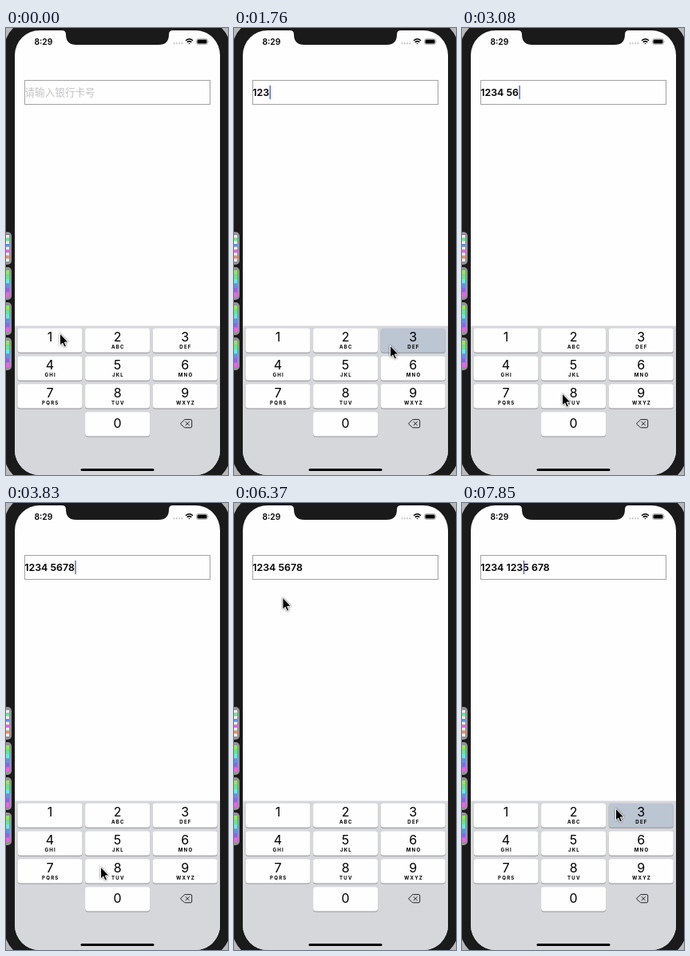
An HTML page that plays this animation: 278x559 px, repeating every 8000 ms.

```html
<!DOCTYPE html>
<html lang="zh">
<head>
<meta charset="utf-8">
<title>Card number input</title>
<style>
  html, body { margin: 0; height: 100%; overflow: hidden; background: #b8b8b8; }
  svg { display: block; width: 278px; height: 559px; font-family: Inter, "Noto Sans", sans-serif; }
  .digit { font-size: 16px; text-anchor: middle; }
  .letters { font-size: 6.1px; font-weight: 700; letter-spacing: 1.2px; text-anchor: middle; }
  .hint { font: 12.6px "Noto Sans CJK SC", "Noto Sans CJK", sans-serif; fill: #c3c3c5; }
  .value { font-size: 12.4px; font-weight: 600; }
  #pointer { filter: drop-shadow(0 .7px .8px #0009); }
</style>
</head>
<body>
<svg viewBox="0 0 278 559">
  <rect x="-2" y="-10" width="283" height="579" rx="36" fill="#1a1a1b"/>
  <g id="dock"></g>
  <clipPath id="screen"><rect x="11" y="3" width="257" height="556" rx="31"/></clipPath>
  <g clip-path="url(#screen)">
    <path fill="#fefefe" d="M11 3h257v556H11z"/>
    <path fill="#d6d7db" d="M11 372.5h257V559H11z"/>
    <path fill="#1a1a1b" d="M70 2v1q5 0 5 5q0 13 13 13H191q13 0 13-13q0-5 5-5v-1z"/>
    <text x="35.500" y="20.500" font-size="10.300" font-weight="600">8:29</text>
    <path d="M210.500 19.300h10" stroke="#c4c4c4" stroke-width="2.200" stroke-linecap="round" stroke-dasharray="0 3.300"/>
    <path d="M225 15.800q4.500-4 9 0M226.700 17.800q2.800-2.400 5.600 0" fill="none" stroke="#000" stroke-width="1.500"/>
    <path d="M228.200 19l1.300 1.300l1.300-1.300z"/>
    <rect x="238.500" y="13.500" width="14" height="7" rx="2" fill="none" stroke="#999" stroke-width=".7"/>
    <rect x="239.500" y="14.500" width="12" height="5" rx="1.200"/>
    <path d="M253.500 15.800q1.200 1.200 0 2.400z" fill="#999"/>
    <rect x="23.500" y="65.500" width="232" height="30" fill="none" stroke="#a3a3a3"/>
    <text id="hint" class="hint" x="23.500" y="85">请输入银行卡号</text>
    <text id="value" class="value" x="23.200" y="85"></text>
    <rect id="caret" width="1.400" fill="#4a62dc"/>
    <g id="keys"></g>
    <g fill="none" stroke="#222" stroke-linejoin="round" stroke-linecap="round">
      <path d="M218.700 494.700l4.300-4.500q.6-.6 1.400-.6h6.600q1.700 0 1.700 1.700v6.800q0 1.700-1.700 1.700h-6.600q-.8 0-1.400-.6z"/>
      <path d="M225 492.500l4.400 4.400m0-4.400l-4.400 4.400"/>
    </g>
    <rect x="93.500" y="551" width="92" height="3" rx="1.500"/>
  </g>
  <path id="pointer" d="M.5 0V15L3.800 12L6 17L8.500 16L6.300 11H11Z" stroke="#fff" stroke-linejoin="round"/>
</svg>
<script>
const $ = id => document.getElementById(id);
const LOOP = 8000, STEP = 148, HOLD = 250;
const CARET_MOVE = 5770, CARET_DROP = 6200;

// Digits are typed at a steady pace in two runs.
const run = (start, gap, count) =>
  Array.from({ length: count }, (_, i) => ({ time: start + i * gap, n: i + 1 }));
const presses = [...run(740, 406, 8), ...run(7250, 295, 3)];

// The pointer visits each pressed key, plus a few stops: [time, x, y].
const tap = ({ time, n }) =>
  [time, 68 + (n - 1) % 3 * 62, 382 + Math.floor((n - 1) / 3) * 35.5];
const stops = [[0, 67, 382], ...presses.map(tap),
  [1776, 195, 397], [3108, 125, 457], [3848, 118, 455], [4884, 80, 90],
  [5476, 70, 84], [CARET_MOVE, 59, 82], [CARET_DROP, 59, 82], [6956, 71, 382],
  [LOOP, 192, 382]].sort((a, b) => a[0] - b[0]);

const names = " , ,ABC,DEF,GHI,JKL,MNO,PQRS,TUV,WXYZ".split(",");
const keys = names.map((name, n) => {
  const slot = n ? n - 1 : 10;
  const x = 14.5 + slot % 3 * 84.6, y = 375.5 + Math.floor(slot / 3) * 34.9;
  const g = document.createElementNS("http://www.w3.org/2000/svg", "g");
  g.setAttribute("transform", `translate(${x} ${y})`);
  g.innerHTML = `<rect y="1" width="81" height="30.300" rx="3.500" fill="#929397"/>
    <rect width="81" height="30.300" rx="3.500"/>
    <text class="digit" x="40.500" y="${n ? 16.5 : 20}">${n}</text>
    <text class="letters" x="41.300" y="25.500">${n ? name : ""}</text>`;
  $("keys").append(g);
  return g.children[1];
});

// Four icons peek in at the left edge, striped through the hues.
for (let i = 0; i < 4; i++) {
  const y = 255 + i * 44, rows = i ? 6 : 9, h = 33 / rows;
  let icon = `<rect x="-30" y="${y}" width="37" height="41" rx="5" fill="#949296"/>`;
  for (let j = 0; j < rows; j++) {
    const color = i || j % 2 ? `hsl(${100 + j * 40} 75% 65%)` : "#eee";
    icon += `<rect y="${y + 4 + j * h}" width="4" height="${h}" fill="${color}"/>`;
  }
  $("dock").innerHTML += icon;
}

function pointerAt(t) {
  const i = Math.max(1, stops.findIndex(s => s[0] >= t));
  const [t0, x0, y0] = stops[i - 1], [t1, x1, y1] = stops[i];
  const k = (t - t0) / (t1 - t0), e = k * k * (3 - 2 * k);
  return [x0 + (x1 - x0) * e, y0 + (y1 - y0) * e];
}

function draw(t) {
  let digits = "", at = 0, lit = -1, active = -860;
  for (const { time, n } of presses) {
    if (t < time) break;
    if (time > CARET_MOVE && at === 8) at = 4;
    digits = digits.slice(0, at) + n + digits.slice(at);
    at++;
    active = time;
    if (t < time + HOLD) lit = n;
  }
  const moved = t >= CARET_MOVE && at === 8;
  if (moved) active = CARET_MOVE;
  const shown = digits.replace(/(\d{4})(?=\d)/g, "$1 ");
  const index = moved ? 5 : at + Math.floor(Math.max(0, at - 1) / 4);
  const value = $("value");
  if (value.textContent !== shown) value.textContent = shown;
  $("hint").style.display = shown ? "none" : "";

  const dragging = moved && t < CARET_DROP;
  const caret = $("caret");
  caret.setAttribute("x", 23.7 + (index ? value.getSubStringLength(0, index) : 0));
  caret.setAttribute("y", dragging ? 66 : 72);
  caret.setAttribute("height", dragging ? 29 : 17);
  caret.style.display = (t - active) % 1000 < 500 ? "" : "none";

  keys.forEach((key, n) => key.setAttribute("fill", n === lit ? "#bcc5d2" : "#fefefe"));
  $("pointer").setAttribute("transform", `translate(${pointerAt(t)})`);
}

// The picture advances in even ticks.
function tick(now) {
  draw(Math.floor((now % LOOP + 30) / STEP) * STEP);
  requestAnimationFrame(tick);
}
draw(0);
requestAnimationFrame(tick);
</script>
</body>
</html>
```
